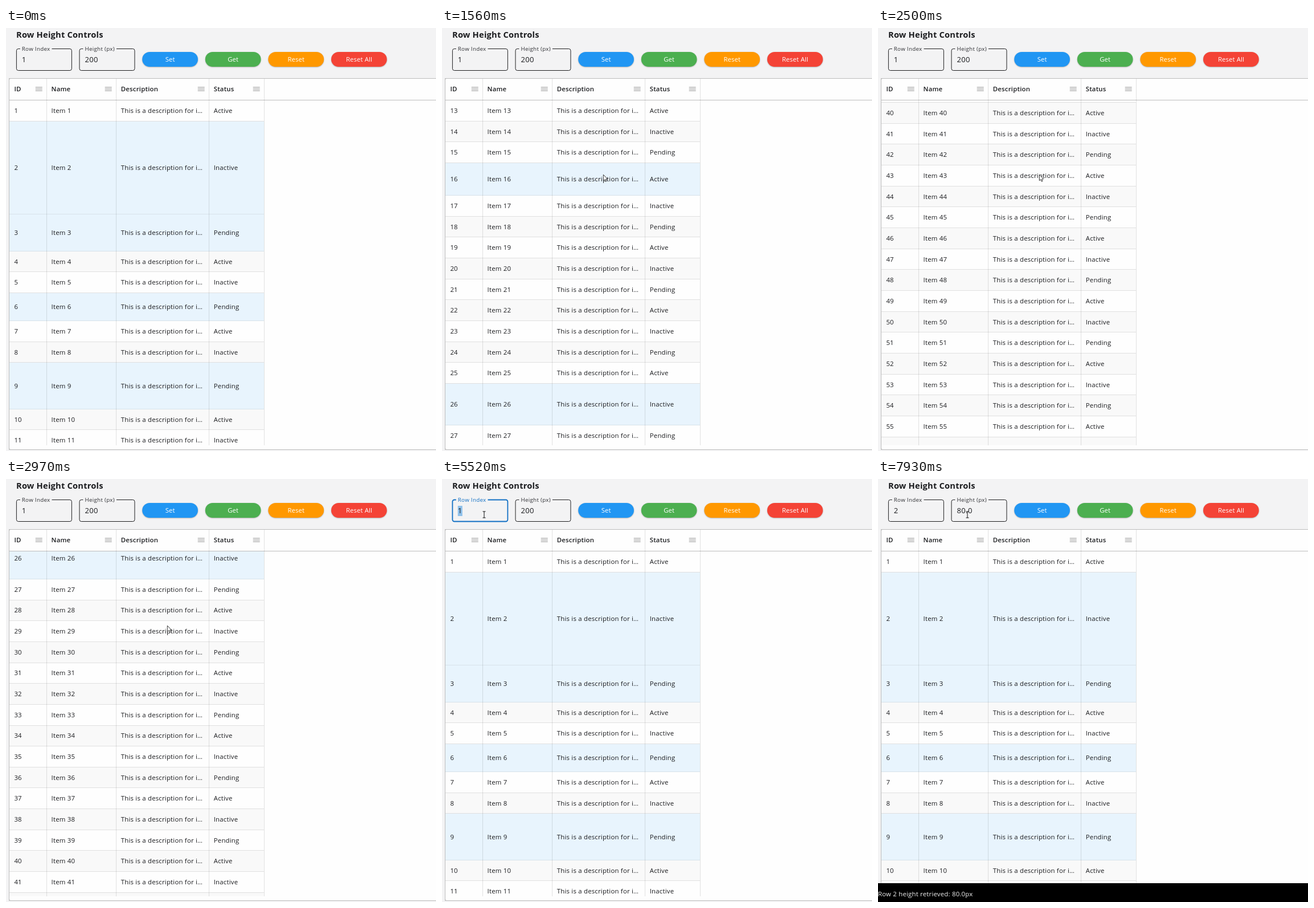
Animation, 755 px wide and 742 px high, one loop 8 s. Source, as an HTML page with a canvas:

```html
<!DOCTYPE html>
<html lang="en">
<head>
<meta charset="utf-8">
<title>Row Height Controls</title>
<style>
  html, body { margin: 0; width: 100%; height: 100%; overflow: hidden; background: #f3f3f4; }
  canvas { display: block; }
</style>
</head>
<body>
<canvas id="stage" width="755" height="742"></canvas>
<script>
const ctx = document.getElementById('stage').getContext('2d');
const W = 755, H = 742, LOOP = 8000, STEP = 70;
const S = 0.8147;                       // display scale of the whole interface
const FONT = '"Open Sans", "Noto Sans", sans-serif';
const INK = '#1b1c1f', BLUE = '#1270c4', PAGE = '#f3f3f4';

// Controls stand in one row of equal slots.
const CONTROL_W = 120 * S;
const slot = i => 18 + i * 110.6;
const BUTTONS = [
  { label: 'Set', color: '#2196f3' },
  { label: 'Get', color: '#4caf50' },
  { label: 'Reset', color: '#ff9800' },
  { label: 'Reset All', color: '#f44336' }
];

const BODY_TOP = 126.5, BODY_END = 732, ROW = 45, ROWS = 100;
const STATUS = ['Pending', 'Active', 'Inactive'];
const TALL = { 2: 200, 3: 80, 6: 60, 9: 100, 16: 70, 26: 90 };

let edge = 5.9;
const COLUMNS = Object.entries({ ID: 80, Name: 150, Description: 200, Status: 120 })
  .map(([title, width]) => {
    const left = edge;
    edge += width * S;
    return { title, left, right: Math.floor(edge) };
  });
const TABLE_W = Math.floor(edge) - 6;

// Wheel flicks: each spreads its notches evenly over a few steps.
const NOTCH = 160;
const FLICKS = [
  { at: 1350, steps: 4, notches: 5 },
  { at: 1890, steps: 3, notches: 4 },
  { at: 2360, steps: 3, notches: 4 },
  { at: 2830, steps: 3, notches: -4 },
  { at: 3240, steps: 2, notches: -5 },
  { at: 3640, steps: 2, notches: -4 }
];

const ENTRY = { x: 412, y: 2 };
const MOVES = [
  { from: 260, to: 750, x: 283, y: 257 },
  { from: 4200, to: 4910, x: 74, y: 62 },
  { from: 5850, to: 6610, x: 400, y: 62 },
  { from: 7480, to: 7930, x: 157, y: 62, dip: 20 }
];

const FOCUS = 5170, SELECT = 5310, TYPED = 5850, BLUR = 6700;
const RETRIEVED = 6750, SNACK = 6780, SNACK_TIME = 260;

const clamp = v => Math.max(0, Math.min(1, v));
const smooth = v => v * v * (3 - 2 * v);

function text(str, x, y, size, { weight = 400, gap = 0.25, color = INK, align = 'left' } = {}) {
  ctx.font = `${weight} ${size * S}px ${FONT}`;
  ctx.letterSpacing = gap * S + 'px';
  ctx.textAlign = align;
  ctx.fillStyle = color;
  ctx.fillText(str, x, y);
}

function rect(x, y, w, h, color) {
  ctx.fillStyle = color;
  ctx.fillRect(x, y, w, h);
}

function roundRect(x, y, w, h, r) {
  ctx.beginPath();
  ctx.roundRect(x, y, w, h, r);
}

function field(x, label, value, { focused, selected } = {}) {
  const tx = x + 12 * S;
  ctx.strokeStyle = focused ? BLUE : '#1d1d1f';
  ctx.lineWidth = focused ? 1.8 : 1;
  roundRect(x + 0.4, 36.5, CONTROL_W - 0.8, 38, 4 * S);
  ctx.stroke();
  ctx.font = `${12 * S}px ${FONT}`;
  ctx.letterSpacing = 0.375 * S + 'px';
  rect(tx - 3, 34, ctx.measureText(label).width + 6, 5, PAGE);
  text(label, tx, 39.6, 12, { gap: 0.375, color: focused ? BLUE : '#303135' });
  if (selected) rect(tx, 47, 8, 18, '#8fc0ea');
  text(value, tx, 60.4, 16, { gap: 0.5 });
  if (focused && !selected) rect(tx + 8, 47, 1.6, 18, BLUE);
}

function button({ label, color }, i) {
  const x = slot(i + 2);
  ctx.save();
  ctx.shadowColor = 'rgba(0,0,0,.3)';
  ctx.shadowBlur = 2;
  ctx.shadowOffsetY = 0.8;
  ctx.fillStyle = color;
  roundRect(x, 42, CONTROL_W, 32 * S, 16 * S);
  ctx.fill();
  ctx.restore();
  text(label, x + CONTROL_W / 2, 59, 14, { weight: 500, gap: 0.1, color: '#fff', align: 'center' });
}

function controls(t) {
  text('Row Height Controls', 18, 17.2, 18, { weight: 700 });
  field(slot(0), 'Row Index', t < TYPED ? '1' : '2', {
    focused: t >= FOCUS && t < BLUR,
    selected: t >= SELECT && t < TYPED
  });
  field(slot(1), 'Height (px)', t < RETRIEVED ? '200' : '80.0');
  BUTTONS.forEach(button);
}

function rows(scroll) {
  ctx.save();
  ctx.beginPath();
  ctx.rect(6, 127, TABLE_W + 1, BODY_END - 127);
  ctx.clip();
  let top = BODY_TOP - scroll * S;
  for (let id = 1; id <= ROWS && top < BODY_END; id++) {
    const h = (TALL[id] || ROW) * S, y = Math.floor(top);
    if (top + h > BODY_TOP) {
      rect(6, y, TABLE_W, Math.ceil(h) + 1, TALL[id] ? '#e8f4fd' : id % 2 ? '#fefefe' : '#f9f9f9');
      rect(6, y, TABLE_W, 1, TALL[id - 1] ? '#d7e2ea' : '#e0e0e0');
      const cells = [id, 'Item ' + id, 'This is a description for i…', STATUS[id % 3]];
      cells.forEach((c, i) => text(c, COLUMNS[i].left + 8.5, top + h / 2 + 4.1, 14));
    }
    top += h;
  }
  ctx.restore();
}

function table(scroll) {
  rect(5, 88, W, 652, '#bdbdbd');
  ctx.fillStyle = '#fefefe';
  roundRect(6, 89, W, 650, [2, 0, 0, 2]);
  ctx.fill();
  rows(scroll);
  rect(6, 126, W, 1, '#bdbdbd');
  for (const { title, left, right } of COLUMNS) {
    rect(right, 89, 1, BODY_END - 89, 'rgba(0,0,0,.11)');
    text(title, left + 8.5, 111.3, 14, { weight: 600 });
    for (let k = 0; k < 3; k++) rect(right - 19.3, 103.5 + 3 * k, 12, 1, '#8c8c8c');
  }
}

function snackbar(t) {
  if (t < SNACK) return;
  const p = clamp((t - SNACK) / SNACK_TIME);
  const top = H - 33 * (1 - (1 - p) ** 3);
  rect(0, top, W, H - top, '#000');
  ctx.globalAlpha = clamp(p * 1.5 - 0.5);
  text('Row 2 height retrieved: 80.0px', 0, top + 23, 14, { color: '#f0f0f0' });
  ctx.globalAlpha = 1;
}

function arrow(x, y) {
  ctx.save();
  ctx.translate(x + 0.3, y + 0.3);
  const shape = new Path2D('M0 0V10.5L2.4 8.4L4 12L5.7 11.2L4.2 7.8L7.3 7.5Z');
  ctx.fillStyle = '#fff';
  ctx.fill(shape);
  ctx.strokeStyle = '#222';
  ctx.lineWidth = 0.9;
  ctx.stroke(shape);
  ctx.restore();
}

function beam(x, y) {
  x = Math.round(x);
  rect(x - 0.5, y - 5, 1, 11, '#111');
  for (const dy of [-5.5, 5.5]) rect(x - 2.5, y + dy, 5, 1, '#111');
}

function pointer(t) {
  if (t < MOVES[0].from) return;
  let { x, y } = ENTRY;
  for (const m of MOVES) {
    const p = smooth(clamp((t - m.from) / (m.to - m.from)));
    x += (m.x - x) * p;
    y += (m.y - y) * p + (m.dip || 0) * Math.sin(Math.PI * p);
  }
  const overField = y > 36 && y < 75 &&
    [0, 1].some(i => x > slot(i) && x < slot(i) + CONTROL_W);
  (overField ? beam : arrow)(x, y);
}

function scrollAt(t) {
  return NOTCH * FLICKS.reduce((sum, { at, steps, notches }) => {
    const done = clamp((Math.floor((t - at) / STEP) + 1) / steps);
    return sum + Math.round(notches * done);
  }, 0);
}

function draw(t) {
  rect(0, 0, W, H, PAGE);
  controls(t);
  table(scrollAt(t));
  snackbar(t);
  pointer(t);
}

const start = performance.now();
function frame() {
  draw((performance.now() - start) % LOOP);
  requestAnimationFrame(frame);
}
frame();
</script>
</body>
</html>
```
